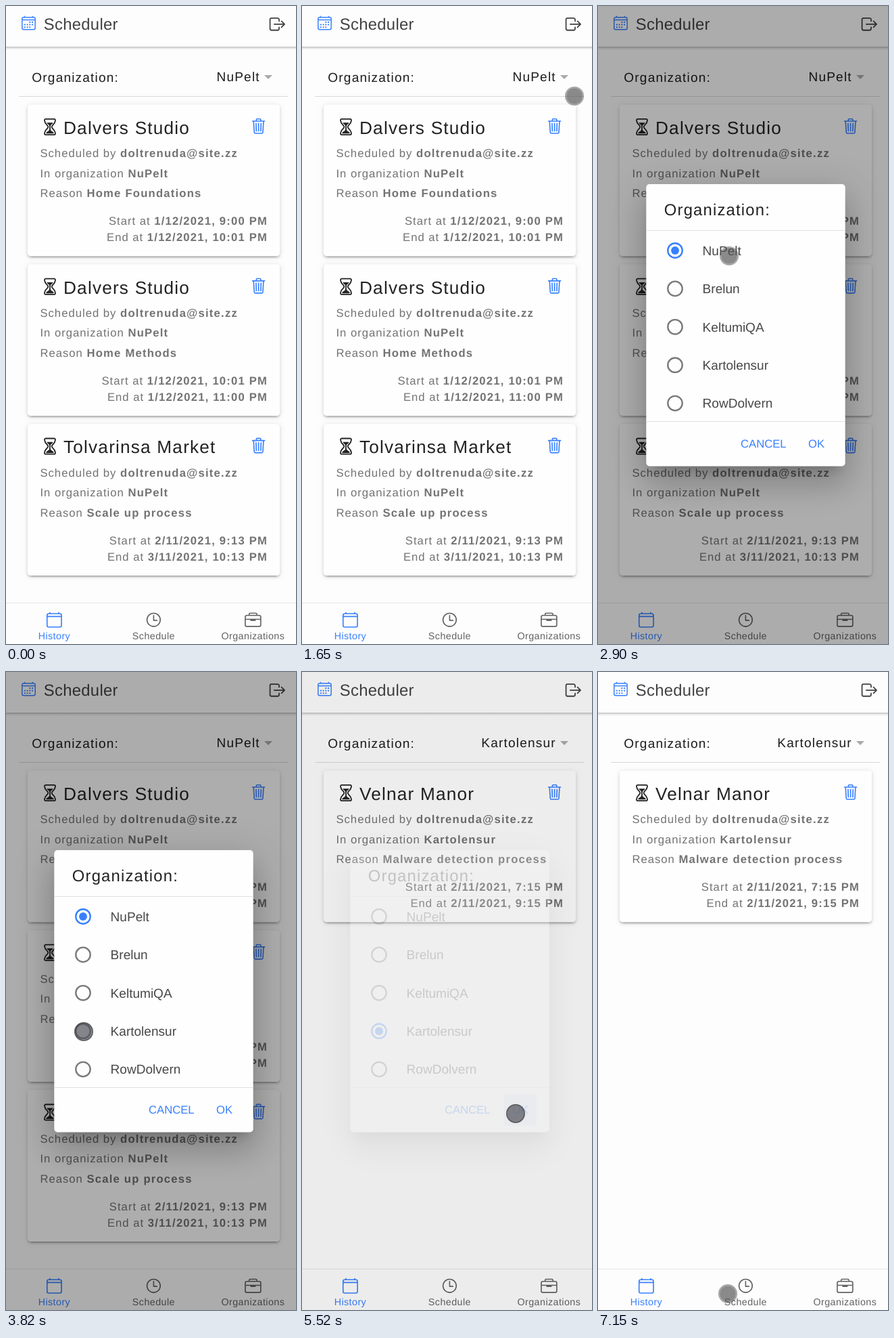
Write an HTML page with a canvas that moves like this. It is 429 by 942 pixels and loops after 8000 ms.

```html
<!DOCTYPE html>
<html lang="en">
<head>
<meta charset="utf-8">
<title>Scheduler</title>
<style>
  html, body { margin: 0; width: 100%; height: 100%; overflow: hidden; background: #fdfdfd; }
  canvas { display: block; width: 100vw; height: 100vh; }
</style>
</head>
<body>
<canvas id="stage"></canvas>
<script>
const W = 429, H = 942, LOOP = 8000;
const R = window.devicePixelRatio || 1;
const U = W / 360;                       // one layout pixel
const BLUE = '#3880ff', DARK = '#424242', GREY = '#737373';
const FAMILY = '"Liberation Sans", Arial, sans-serif';

const stage = document.getElementById('stage');
const layer = document.createElement('canvas');
for (const c of [stage, layer]) { c.width = W * R; c.height = H * R; }
const main = stage.getContext('2d'), sheet = layer.getContext('2d');
let g = main;

const MAIL = 'doltrenuda@site.zz';
const ORGS = ['NuPelt', 'Brelun', 'KeltumiQA', 'Kartolensur', 'RowDolvern'];
const BEFORE = [
  ['Dalvers Studio', 'Home Foundations', '1/12/2021, 9:00 PM', '1/12/2021, 10:01 PM'],
  ['Dalvers Studio', 'Home Methods', '1/12/2021, 10:01 PM', '1/12/2021, 11:00 PM'],
  ['Tolvarinsa Market', 'Scale up process', '2/11/2021, 9:13 PM', '3/11/2021, 10:13 PM']
];
const AFTER = [
  ['Velnar Manor', 'Malware detection process', '2/11/2021, 7:15 PM', '2/11/2021, 9:15 PM']
];

const OPEN = 2171, RIPPLE = 2110, PICK = 4140, CLOSE = 5414, SWAP = 5450;

// Screen refreshes: first, last, count
const TICKS = [
  [780, 1580, 11], [1650, 2270, 9], [2370, 2440, 2], [2520, 2900, 6], [2980, 3270, 5],
  [3350, 3820, 7], [4140, 4820, 10], [4990, 5060, 2], [5290, 5290, 1], [5450, 5520, 2],
  [5610, 5610, 1], [6240, 6310, 2], [6460, 7150, 10]
];

// Pointer path: time, x, y
const PATH = [
  [780, 389, 871], [1020, 375, 715], [1260, 390, 485], [1430, 413, 270], [1580, 409, 148],
  [1650, 403, 133], [1810, 385, 103], [2450, 385, 103], [2700, 300, 215], [2900, 194, 369],
  [3050, 140, 420], [3270, 113, 498], [3820, 115, 531], [4070, 115, 531], [4400, 190, 595],
  [4740, 321, 650], [4820, 308, 652], [4930, 308, 652], [5060, 316, 652], [6170, 316, 652],
  [6240, 312, 614], [6310, 285, 578], [6400, 285, 578], [6560, 318, 660], [6700, 333, 760],
  [6860, 308, 880], [7000, 250, 922], [7150, 192, 918], [LOOP, 192, 918]
];

const ICONS = {
  frame: 'M96 80H416a48 48 0 0 1 48 48V416a48 48 0 0 1 -48 48H96a48 48 0 0 1 -48 -48V128a48 48 0 0 1 48 -48z'
    + 'M48 160H464M128 48V80M384 48V80',
  exit: 'M304 336v40a40 40 0 0 1 -40 40H104a40 40 0 0 1 -40 -40V136a40 40 0 0 1 40 -40h152'
    + 'c22 0 48 18 48 40v40M368 336l80 -80l-80 -80M176 256H432',
  bin: 'M112 112l20 320c1 18 14 32 32 32h184c18 0 31 -14 32 -32l20 -320M80 112H432'
    + 'M192 112V72a24 24 0 0 1 24 -24h80a24 24 0 0 1 24 24v40M256 176V400M184 176l8 224M328 176l-8 224',
  glass: 'M146 464h220c20 0 36 -16 34 -35C386 308 304 310 304 256s83 -51 96 -173c2 -19 -14 -35 -34 -35'
    + 'H146c-20 0 -36 16 -34 35C125 205 208 201 208 256s-82 52 -96 173c-2 19 14 35 34 35z',
  sand: 'M343 432H169c-15 0 -20 -18 -9 -29C187 376 240 357 240 326V224c0 -20 -38 -35 -62 -67'
    + 'c-4 -5 -3 -13 7 -13h143c8 0 10 7 6 13C311 189 272 204 272 224v102c0 31 56 47 80 77c10 12 7 29 -9 29z',
  clock: 'M448 256a192 192 0 1 1 -384 0a192 192 0 1 1 384 0zM256 128V272H352',
  bag: 'M80 128H432a48 48 0 0 1 48 48V400a48 48 0 0 1 -48 48H80a48 48 0 0 1 -48 -48V176a48 48 0 0 1 48 -48z'
    + 'M144 128V96a32 32 0 0 1 32 -32h160a32 32 0 0 1 32 32v32M480 240H32M320 240v32H192v-32'
};
for (const k in ICONS) ICONS[k] = new Path2D(ICONS[k]);

const clamp = v => Math.max(0, Math.min(1, v));
const ease = v => { v = clamp(v); return v * v * (3 - 2 * v); };

function snap(t) {
  let s = 0;
  for (const [a, b, n] of TICKS) {
    if (t < a) break;
    const d = n > 1 ? (b - a) / (n - 1) : 1;
    s = Math.min(b, a + Math.floor((t - a) / d + 1e-6) * d);
  }
  return s;
}

function slope(i, k) {
  const p = PATH[i - 1], c = PATH[i], n = PATH[i + 1];
  if (!p || !n) return 0;
  const still = (a, b) => a[1] === b[1] && a[2] === b[2];
  return still(p, c) || still(c, n) ? 0 : (n[k] - p[k]) / (n[0] - p[0]);
}

function pointerAt(t) {
  let i = 0;
  while (i < PATH.length - 2 && t >= PATH[i + 1][0]) i++;
  const a = PATH[i], b = PATH[i + 1], d = b[0] - a[0], u = (t - a[0]) / d;
  const s = u * u * (3 - 2 * u);
  return [1, 2].map(k => a[k] + (b[k] - a[k]) * s
    + d * u * (1 - u) * ((1 - u) * slope(i, k) - u * slope(i + 1, k)));
}

function font(size, gap, weight = 400) {
  g.font = `${weight} ${size * U}px ${FAMILY}`;
  g.letterSpacing = gap + 'px';
  g.textRendering = 'geometricPrecision';
}

// Baselines sit on whole pixels
function text(s, x, y, size, color, gap = 0, weight = 400, align = 0) {
  font(size, gap, weight);
  const w = g.measureText(s).width;
  g.fillStyle = color;
  g.fillText(s, x - w * align, Math.round(y));
  return w;
}

// Plain label followed by a bold value
function pair(label, value, x, y, right) {
  if (right) {
    const w = text(value, x, y, 14, GREY, U, 700, 1);
    text(label, x - w, y, 14, GREY, 1, 400, 1);
  } else {
    const w = text(label, x, y, 14, GREY, 1);
    text(value, x + w, y, 14, GREY, U, 700);
  }
}

function disc(x, y, r, color) {
  g.fillStyle = color;
  g.beginPath();
  g.arc(x, y, r, 0, Math.PI * 2);
  g.fill();
}

function ring(x, y, r, width, color) {
  g.strokeStyle = color;
  g.lineWidth = width;
  g.beginPath();
  g.arc(x, y, r, 0, Math.PI * 2);
  g.stroke();
}

function box(x, y, w, h, r, color) {
  g.fillStyle = color;
  g.beginPath();
  g.roundRect(x, y, w, h, r);
  g.fill();
}

function rule(x, y, w, color) {
  g.fillStyle = color;
  g.fillRect(x, y, w, 1);
}

function shadow(x, y, w, h, dy, blur, spread, alpha) {
  const far = 2000, e = spread * U;
  g.save();
  g.shadowColor = `rgba(0,0,0,${alpha})`;
  g.shadowBlur = blur * U * R;
  g.shadowOffsetX = far * R;
  g.shadowOffsetY = dy * U * R;
  box(x - e - far, y - e, w + 2 * e, h + 2 * e, 4 * U, '#000');
  g.restore();
}

function icon(name, x, y, size, color, solid) {
  g.save();
  g.translate(x, y);
  g.scale(size * U / 512, size * U / 512);
  g.translate(-256, -256);
  g.lineWidth = 32;
  g.lineCap = g.lineJoin = 'round';
  g.fillStyle = g.strokeStyle = color;
  g[solid ? 'fill' : 'stroke'](ICONS[name]);
  g.restore();
}

function header() {
  const fade = g.createLinearGradient(0, 60, 0, 65);
  fade.addColorStop(0, 'rgba(0,0,0,.26)');
  fade.addColorStop(.4, 'rgba(0,0,0,.1)');
  fade.addColorStop(1, 'rgba(0,0,0,0)');
  g.fillStyle = fade;
  g.fillRect(0, 60, W, 5);
  icon('frame', 33.5, 25, 20, BLUE);
  for (let i = 2; i < 11; i++) {
    const col = i % 4, row = Math.floor(i / 4);
    disc(33.5 + (col * 80 - 120) * .0465, 25 + (row * 80 - 24) * .0465, 1.15, BLUE);
  }
  text('Scheduler', 55.8, 35, 20, DARK, .25 * U);
  icon('exit', 401.3, 26.8, 24, DARK);
}

function picker(name) {
  text('Organization:', 38.3, 112, 16, '#1c1c1c', U);
  text(name, 375.8, 111, 16, '#1c1c1c', U, 400, 1);
  g.fillStyle = '#aaa';
  g.beginPath();
  g.moveTo(382, 102);
  g.lineTo(394, 102);
  g.lineTo(388, 108);
  g.fill();
  rule(19.5, 133, 397.5, '#d8d8d8');
}

function card([title, reason, start, end], org, y) {
  const x = 31.8, w = 373.4, h = 188 * U;
  shadow(x, y, w, h, 3, 1, -2, .2);
  shadow(x, y, w, h, 2, 2, 0, .14);
  shadow(x, y, w, h, 1, 5, 0, .12);
  box(x, y, w, h, 4 * U, '#fefefe');
  icon('glass', 65, y + 33.1, 24, '#222');
  icon('sand', 65, y + 33.1, 24, '#222', true);
  text(title, 85, y + 43.4, 22, '#222', U);
  icon('bin', 373.6, y + 32, 22, BLUE);
  pair('Scheduled by ', MAIL, 50.4, y + 77.6);
  pair('In organization ', org, 50.4, y + 107.2);
  pair('Reason ', reason, 50.4, y + 136.6);
  pair('Start at ', start, 387.2, y + 177.6, true);
  pair('End at ', end, 387.2, y + 201.6, true);
}

function tabs() {
  rule(0, 881, W, '#e6e6e6');
  const list = [['frame', 'History', 71.4, BLUE], ['clock', 'Schedule', 218.4, '#636363'],
    ['bag', 'Organizations', 365.4, '#636363']];
  for (const [name, label, x, color] of list) {
    icon(name, x, 906.3, 22, color);
    text(label, x, 935, 12, color, .43, 400, .5);
  }
}

function ripple(t) {
  const a = .16 * clamp((t - RIPPLE) / 75) * (1 - clamp((t - 2300) / 130));
  if (!a) return;
  const p = ease((t - RIPPLE) / 225);
  g.save();
  g.beginPath();
  g.rect(19.5, 76, 398.5, 57);
  g.clip();
  disc(385 - 166 * p, 104, 99.5 + 106.5 * p, `rgba(0,0,0,${a})`);
  g.restore();
}

function radio(y, on, fill) {
  ring(114, y, 9 * U, 2 * U, on ? BLUE : '#7a7a7a');
  if (fill > 0) disc(114, y, 5 * U * fill, BLUE);
}

function dialog(t) {
  const x = 71.3, y = 263, w = 294.4, h = 416.4;
  shadow(x, y, w, h, 11, 15, -7, .2);
  shadow(x, y, w, h, 24, 38, 3, .14);
  shadow(x, y, w, h, 9, 46, 8, .12);
  box(x, y, w, h, 4 * U, '#fefefe');
  text('Organization:', 97.8, 309, 20, '#222', U);
  rule(x, 331, w, '#e0e0e0');
  rule(x, 613, w, '#e0e0e0');
  const moved = ease((t - PICK) / 280), chosen = t >= PICK ? 3 : 0;
  ORGS.forEach((name, i) => {
    const cy = 361 + i * 56.4;
    radio(cy, i === chosen, i === 3 ? moved : i === 0 ? 1 - moved : 0);
    text(name, 154.6, cy + 6.7, 16, '#484848');
  });
  if (t >= SWAP) box(299, 623, 48, 47, 2 * U, 'rgba(56,128,255,.16)');
  text('CANCEL', 211, 652, 14, BLUE);
  text('OK', 311, 652, 14, BLUE);
}

function popup(t) {
  const gone = ease((t - CLOSE) / 150), come = ease((t - OPEN) / 150);
  const a = come * (1 - gone);
  if (!a) return;
  g.fillStyle = `rgba(0,0,0,${.32 * a})`;
  g.fillRect(0, 0, W, H);

  g = sheet;
  g.setTransform(R, 0, 0, R, 0, 0);
  g.clearRect(0, 0, W, H);
  dialog(t);
  g = main;

  const s = .9 + .1 * come;
  g.save();
  g.globalAlpha = a;
  g.translate(218.5, 471.2);
  g.scale(s, s);
  g.drawImage(layer, -218.5, -471.2, W, H);
  g.restore();
}

function pointer(t) {
  if (t < PATH[0][0]) return;
  const [x, y] = pointerAt(t);
  const down = (t >= 2050 && t < 2370) || (t >= 3820 && t < PICK) || (t >= 5290 && t < 5610);
  disc(x, y, 11.8, down ? 'rgba(80,80,90,.7)' : 'rgba(80,80,80,.67)');
  ring(x, y, 12.9, 2.2, down ? 'rgba(60,60,65,.8)' : 'rgba(80,80,80,.5)');
}

function draw(t) {
  const swapped = t >= SWAP, org = ORGS[swapped ? 3 : 0];
  g.setTransform(stage.width / W, 0, 0, stage.height / H, 0, 0);
  g.fillStyle = '#fdfdfd';
  g.fillRect(0, 0, W, H);
  header();
  picker(org);
  (swapped ? AFTER : BEFORE).forEach((c, i) => card(c, org, 145.4 + i * 235.8));
  tabs();
  ripple(t);
  popup(t);
  pointer(t);
}

const begin = performance.now();
function loop() {
  draw(snap((performance.now() - begin) % LOOP));
  requestAnimationFrame(loop);
}
loop();
</script>
</body>
</html>
```
